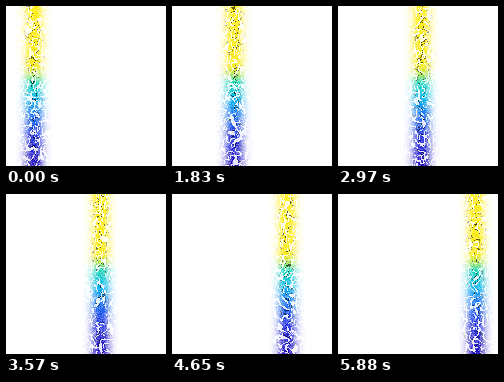
Animation, 160 px wide and 160 px high, one loop 5.91 s. Source, as an HTML page with a canvas:

```html
<!DOCTYPE html>
<html lang="en">
<head>
<meta charset="utf-8">
<title>Drifting beam</title>
<style>
html, body { margin: 0; width: 100%; height: 100%; overflow: hidden; background: #fff; }
canvas { display: block; width: 160px; height: 160px; }
</style>
</head>
<body>
<canvas id="stage" width="160" height="160"></canvas>
<script>
const SIZE = 160, LOOP = 5910, STEPS = 281;
const START_X = 27.5, SPEED = 0.394, REACH = 18.4, SPREAD = 9;
const CELL_W = 2.3, CELL_H = 4.2, BEND = 8, SWAY = 9;

// y, red, green, blue
const STOPS = [
  [0, 255, 236, 0],
  [60, 248, 232, 10],
  [68, 170, 228, 80],
  [76, 25, 215, 185],
  [92, 0, 180, 235],
  [108, 20, 115, 245],
  [130, 35, 50, 225],
  [160, 30, 10, 190]
];

const ctx = document.getElementById('stage').getContext('2d');
const image = ctx.createImageData(SIZE, SIZE);
const pixels = image.data;

function colorAt(y) {
  let i = 1;
  while (STOPS[i][0] < y) i++;
  const a = STOPS[i - 1], b = STOPS[i];
  const k = (y - a[0]) / (b[0] - a[0]);
  return [1, 2, 3].map(c => a[c] + (b[c] - a[c]) * k);
}
const rows = Array.from({ length: SIZE }, (_, y) => colorAt(y));

function hash(x, y, seed) {
  let h = Math.imul(x + 101, 374761393) ^ Math.imul(y + 211, 668265263) ^ Math.imul(seed + 17, 1442695041);
  h = Math.imul(h ^ (h >>> 13), 1274126177);
  h = Math.imul(h ^ (h >>> 15), 2246822519);
  return ((h ^ (h >>> 16)) >>> 0) / 4294967296;
}

const mix = (a, b, k) => a + (b - a) * k;
const smooth = k => k * k * (3 - 2 * k);

function noise(x, y, seed) {
  const gx = Math.floor(x), gy = Math.floor(y);
  const u = smooth(x - gx), v = smooth(y - gy);
  return mix(
    mix(hash(gx, gy, seed), hash(gx + 1, gy, seed), u),
    mix(hash(gx, gy + 1, seed), hash(gx + 1, gy + 1, seed), u), v);
}

// Upright strokes that lean to either side.
function strokes(x, y, seed) {
  const lean = BEND * noise(x / SWAY, y / SWAY, seed + 2000);
  return noise((x + lean) / CELL_W, y / CELL_H, seed) - 0.5;
}

function draw(step) {
  const center = START_X + step * SPEED;
  const left = Math.max(0, Math.ceil(center - REACH));
  const right = Math.min(SIZE - 1, Math.floor(center + REACH));
  pixels.fill(255);
  for (let y = 0; y < SIZE; y++) {
    for (let x = left; x <= right; x++) {
      const d = (x - center) / SPREAD;
      const glow = Math.exp(-d * d);
      const n = strokes(x, y, step);
      const grain = hash(x, y, step + 1000);
      let alpha = Math.min(1, glow * (0.6 + 0.6 * grain));
      let shade = 1;
      // Pale threads follow the noise contour, with dark flecks beside them.
      if (Math.abs(n) < 0.1) alpha *= 0.12;
      else if (n > 0 && n < 0.22 && grain < 0.4 * glow) {
        shade = 0.35;
        alpha = glow;
      }
      const p = (y * SIZE + x) * 4;
      for (let c = 0; c < 3; c++) pixels[p + c] = mix(255, rows[y][c] * shade, alpha);
    }
  }
  ctx.putImageData(image, 0, 0);
}

const origin = performance.now();
let shown = -1;

function tick() {
  const t = (performance.now() - origin) % LOOP;
  const step = Math.min(STEPS - 1, Math.floor(t / LOOP * STEPS));
  if (step !== shown) draw(shown = step);
  requestAnimationFrame(tick);
}
tick();
</script>
</body>
</html>
```
